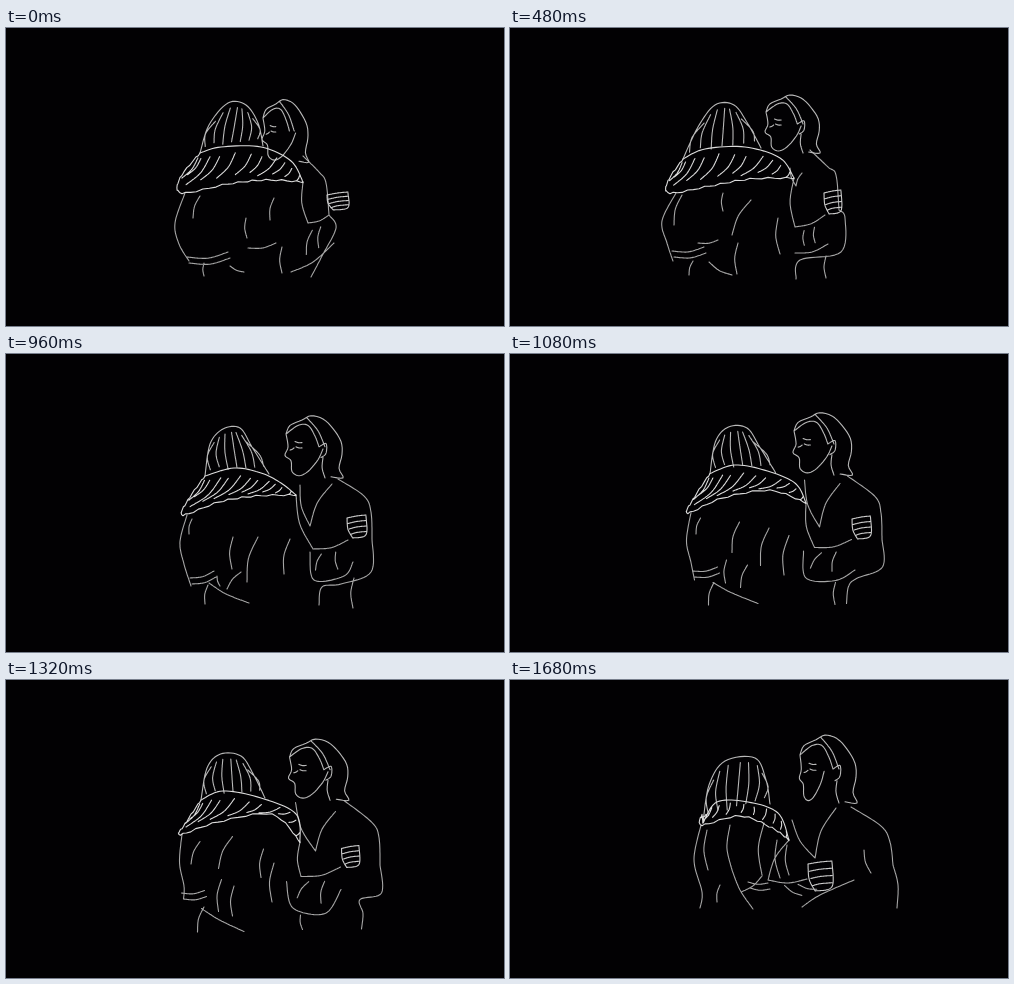
Recreate the animation shown at these times as an HTML page. Size 498 by 298 pixels, loop 1800 ms.

```html
<!DOCTYPE html>
<html lang="en">
<head>
<meta charset="utf-8">
<title>Two figures, line drawing</title>
<style>
html, body { margin: 0; width: 100%; height: 100%; overflow: hidden; background: #020103; }
svg { display: block; width: 100vw; height: 100vh; }
path { fill: none; stroke-linecap: round; stroke-linejoin: round; }
</style>
</head>
<body>
<svg viewBox="0 0 498 298"><g id="ink"></g></svg>
<script>
const STEP = 120, STEPS = 15, N = 40;
const looks = {
  soft: ['#a6a6a6', 1.1], hair: ['#b8b8b8', 1.1],
  fur: ['#dcdcdc', 1.1], hand: ['#cccccc', 1.1]
};
const poses = [];

const mix = (a, b, t) => a + (b - a) * t;
const mixPt = (a, b, t) => [mix(a[0], b[0], t), mix(a[1], b[1], t)];
const mixLine = (a, b, t) => a.map((p, i) => mixPt(p, b[i], t));
const noise = i => Math.abs(Math.sin(i * 12.9898) * 43758.5453) % 1;

function points(text) {
  const n = text.split(' ').map(Number), out = [];
  for (let i = 0; i < n.length; i += 2) out.push([n[i], n[i + 1]]);
  return out;
}

// Smooth line through the points; two points alone get a slight bow.
function curve(pts) {
  if (pts.length === 2) {
    const [a, b] = pts, m = mixPt(a, b, 0.5);
    pts = [a, [m[0] - (b[1] - a[1]) * 0.09, m[1] + (b[0] - a[0]) * 0.09], b];
  }
  const last = pts.length - 1;
  const at = i => pts[Math.max(0, Math.min(last, i))];
  return Array.from({ length: N + 1 }, (_, k) => {
    const u = k / N * last, i = Math.min(last - 1, Math.floor(u)), t = u - i;
    return [0, 1].map(c => {
      const [p, q, r, s] = [at(i - 1)[c], at(i)[c], at(i + 1)[c], at(i + 2)[c]];
      return q + 0.5 * t * (r - p + t * (2 * p - 5 * q + 4 * r - s + t * (3 * (q - r) + s - p)));
    });
  });
}
const pick = (line, u) => line[Math.round(u * N)];

const profile = '0 0 2 12 -1 20 5 25 6 35 13 39 22 35 32 24 37 14';
const headLines = [
  '0 0 4 -8 16 -13 25 -17 37 -14 47 -5 55 7 56 19 53 32 57 41 45 40',
  '0 0 12 -8 22 -8 29 2 33 12', '21 -15 32 -3 39 12',
  '4 15 8 13', '9 7 16 8', '10 12 16 13'
];
const earNeck = ['33 12 40 9 40 18 35 22', '37 22 39 41'];

function head([x, y, sx, sy, wide], open) {
  const place = (text, w) => curve(points(text).map(p => [x + p[0] * sx * w, y + p[1] * sy]));
  return [place(profile, wide), ...headLines.concat(open ? earNeck : []).map(s => place(s, 1))];
}

function hand([x, y, w, h]) {
  const out = [];
  for (let i = 0; i < 4; i++) {
    const fy = y + h * i / 4;
    out.push(curve([[x + i * w * 0.06, fy + 2], [x + w * 0.5, fy], [x + w, fy - 1]]));
  }
  out.push(curve([[x + w, y], [x + w, y + h * 0.85], [x + w * 0.3, y + h]]));
  out.push(curve([[x, y + 2], [x + w * 0.05, y + h * 0.6], [x + w * 0.3, y + h]]));
  return out;
}

function pose(step, p) {
  const hairPts = points(p.hair), edgePts = points(p.edge);
  const tip = edgePts[edgePts.length - 1];
  const hair = curve(hairPts);
  const edge = curve([hairPts[0], ...edgePts]);
  const rim = curve([hairPts[0], ...points(p.rim), tip]);
  const sleeve = points(p.sleeve), top = curve(sleeve), under = curve(points(p.under));
  const shoulder = points(p.shoulder);

  const strands = [], fur = [];
  for (let i = 0; i < 7; i++) {
    const a = pick(hair, 0.28 + 0.07 * i), b = mixPt(hair[0], hair[N], (i + 0.6) / 7.2);
    const m = mixPt(a, b, 0.5);
    strands.push(curve([[a[0], a[1] + 6], [m[0] + (i - 3) * 1.6, m[1]], [b[0], b[1] - 6 - 3 * noise(i)]]));
  }
  for (let i = 0; i < 11; i++) {
    const low = pick(edge, 0.24 + 0.071 * i), high = pick(rim, 0.05 + 0.084 * i);
    fur.push(curve([mixPt(low, high, 0.16 + 0.2 * noise(i)), mixPt(low, high, 0.66 + 0.2 * noise(i + 20))]));
  }

  const cuff = points(p.cuff);
  const soft = [
    curve(points(p.back)), curve(cuff), curve(cuff.map(([x, y]) => [x + 2, y + 6])),
    curve([tip, sleeve[0]]), top, under,
    ...[0.3, 0.6].map(u => curve([0.18, 0.72].map(t => mixPt(pick(top, u), pick(under, u), t)))),
    curve(shoulder), curve([shoulder[shoulder.length - 1], ...points(p.elbow)])
  ];
  const lapel = p.lapel ? points(p.lapel) : null;
  soft.push(lapel && curve([lapel[0], lapel[1]]), lapel && curve([lapel[2], lapel[1]]));
  soft.push(p.side ? curve(points(p.side)) : null);
  soft.push(...p.folds.split('|').map(s => curve(points(s))));

  poses.push({
    step, soft, hair: [hair, ...strands, ...head(p.head, lapel)],
    fur: [rim, edge.map(([x, y], k) => [x, y + 0.8 * Math.sin(k * 2.1)]), ...fur],
    hand: hand(p.hand)
  });
}

pose(0, {
  hair: '194 125 203 97 222 75 240 77 252 95 257 118',
  rim: '215 119 255 119 285 133', edge: '174 150 176 165 222 156 260 152 297 154',
  back: '179 165 169 195 173 216 183 233', cuff: '181 229 222 224',
  folds: '198 235 198 248|224 238 238 244|194 168 187 190|240 190 241 210|268 170 264 192|276 219 276 245|242 220 270 215',
  sleeve: '302 195 323 187', under: '285 244 307 234 328 215',
  shoulder: '297 128 313 144 320 155 323 187', elbow: '330 200 316 228 305 249',
  head: [257, 90, 0.8, 1.08, 1.1], hand: [321, 165, 21, 17]
});
pose(4, {
  hair: '173 131 188 99 205 77 224 77 238 96 251 120',
  rim: '195 121 235 119 270 130', edge: '158 153 160 165 200 158 240 151 284 150',
  back: '166 165 152 193 157 215 163 233', cuff: '162 223 194 219',
  folds: '183 233 179 247|199 234 222 247|172 167 164 197|213 165 213 183|241 172 222 207|228 215 227 246|188 215 208 212|268 190 270 226',
  sleeve: '285 199 315 187', under: '285 225 302 224 318 216',
  shoulder: '300 122 318 139 326 147 329 182', elbow: '335 190 331 224 290 232 286 251',
  side: '316 228 316 250', lapel: '280 140 286 158 292 145',
  head: [256, 84, 0.95, 1, 1], hand: [314, 163, 17, 23]
});
pose(6, {
  hair: '189 125 196 93 213 77 231 79 246 101 263 125',
  rim: '215 121 245 122 272 130', edge: '170 150 170 163 210 152 250 147 288 147',
  back: '169 163 162 190 165 210 171 228', cuff: '170 229 209 222',
  folds: '194 233 191 249|209 230 228 240|185 166 173 205|219 163 220 193|251 177 239 210|237 215 229 245|178 219 212 214|278 190 273 225',
  sleeve: '299 200 327 187', under: '302 228 317 227 330 222',
  shoulder: '306 124 336 139 347 150 348 188', elbow: '350 205 348 222 301 235 298 253',
  side: '332 228 331 250', lapel: '284 131 299 175 321 141',
  head: [268, 86, 1, 1, 1], hand: [326, 166, 21, 19]
});
pose(8, {
  hair: '199 122 204 90 217 75 234 74 246 93 263 120',
  rim: '228 114 255 119 275 129', edge: '182 146 177 161 213 148 250 142 290 141',
  back: '181 161 174 188 178 210 185 232', cuff: '184 224 208 217',
  folds: '202 231 199 250|203 229 220 240 243 249|186 165 183 180|227 183 226 215|252 183 241 228|235 218 221 235|211 222 214 232|284 185 278 220',
  sleeve: '307 195 342 186', under: '304 198 308 226 338 222 347 208',
  shoulder: '332 125 358 142 365 158 366 185', elbow: '365 218 335 230 316 233 313 251',
  side: '348 224 347 254', lapel: '294 131 304 172 326 130',
  head: [280, 80, 1, 1.07, 1], hand: [341, 162, 19, 22]
});
pose(10, {
  hair: '201 117 207 85 220 71 240 74 254 94 268 117',
  rim: '222 108 260 115 296 130', edge: '184 145 179 157 212 140 270 131 302 157',
  back: '181 156 179 185 184 207 184 220', cuff: '181 210 207 209',
  folds: '206 226 198 252|203 228 222 237 253 250|195 163 189 180|232 153 218 182|266 165 260 195|240 204 240 232|222 190 217 226|274 178 270 222',
  sleeve: '302 192 341 185', under: '283 196 284 222 313 231 343 224',
  shoulder: '343 119 372 143 377 160 378 185', elbow: '380 208 358 219 361 232 360 248',
  side: '303 233 303 247', lapel: '295 121 315 174 334 129',
  head: [288, 74, 1.05, 1.08, 1], hand: [343, 164, 18, 22]
});
pose(12, {
  hair: '189 123 195 91 209 77 230 78 241 95 250 119',
  rim: '212 114 250 121 284 138', edge: '174 143 170 152 212 144 262 138 286 167',
  back: '171 152 168 180 172 205 171 218', cuff: '170 216 190 212',
  folds: '190 228 185 252|188 229 205 243 223 253|193 160 181 188|221 160 207 195|249 173 250 200|216 208 213 240|209 209 208 237|262 188 262 222',
  sleeve: '288 201 328 189', under: '278 207 290 234 325 236 327 195',
  shoulder: '333 122 360 142 369 155 370 185', elbow: '371 218 350 220 353 235 351 250',
  side: '286 237 290 252', lapel: '284 124 304 168 325 134',
  head: [279, 80, 1.03, 1.03, 1], hand: [328, 169, 17, 20]
});
pose(14, {
  hair: '193 143 199 105 215 81 245 78 256 100 260 124',
  rim: '207 122 238 122 268 133', edge: '192 135 192 145 230 136 262 148 279 160',
  back: '191 145 184 180 192 212 190 228', cuff: '238 202 258 203',
  folds: '210 205 207 222|222 190 230 210 243 229|197 150 198 190|220 145 222 190|254 143 252 195|231 212 252 196|267 160 270 198|277 165 279 195',
  sleeve: '258 200 297 199', under: '292 227 310 215 344 200',
  shoulder: '341 127 371 146 380 162 383 185', elbow: '388 205 387 228',
  side: '354 170 361 193', lapel: '282 140 305 178 326 128',
  head: [290, 75, 1, 1.17, 0.65], hand: [298, 182, 24, 29]
});

const lines = {};
for (const part in looks) {
  const el = document.createElementNS('http://www.w3.org/2000/svg', 'path');
  el.setAttribute('stroke', looks[part][0]);
  el.setAttribute('stroke-width', looks[part][1]);
  lines[part] = document.getElementById('ink').appendChild(el);
}
const toPath = pts => 'M' + pts.map(p => p[0].toFixed(1) + ' ' + p[1].toFixed(1)).join('L');

function draw(step) {
  let i = 0;
  while (i < poses.length - 2 && poses[i + 1].step <= step) i++;
  const from = poses[i], to = poses[i + 1];
  const t = (step - from.step) / (to.step - from.step);
  for (const part in looks) {
    const count = Math.max(from[part].length, to[part].length);
    let d = '';
    for (let k = 0; k < count; k++) {
      const a = from[part][k], b = to[part][k];
      const pts = a && b ? mixLine(a, b, t) : t < 0.5 ? a : b;
      if (pts) d += toPath(pts);
    }
    lines[part].setAttribute('d', d);
  }
}

let shown = -1;
const start = performance.now();
function tick() {
  const step = Math.floor((performance.now() - start) / STEP) % STEPS;
  if (step !== shown) draw(shown = step);
  requestAnimationFrame(tick);
}
tick();
</script>
</body>
</html>
```
